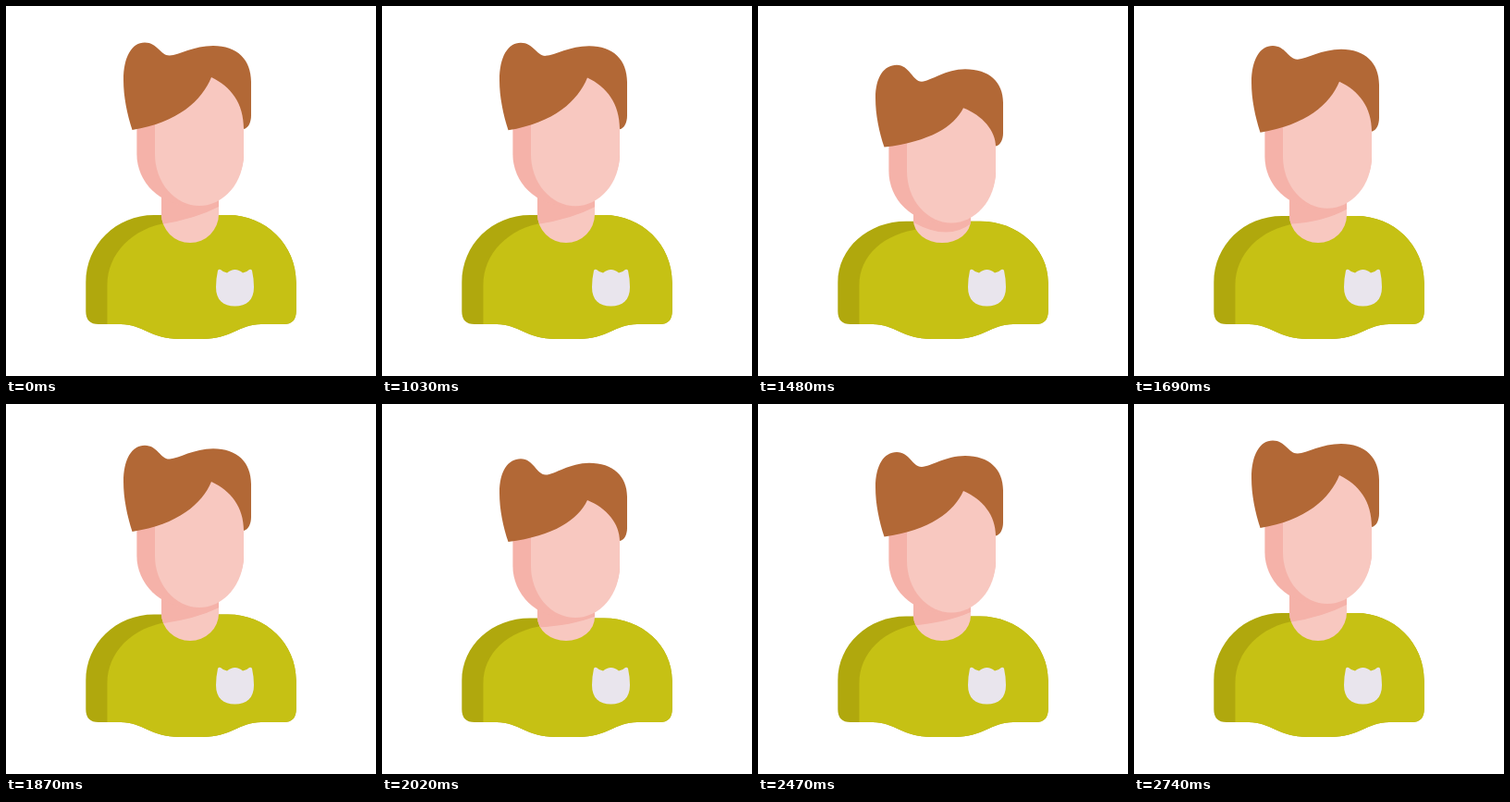
Recreate the animation shown at these times as an HTML page. Size 400 by 400 pixels, loop 2.77 s.

```html
<!DOCTYPE html>
<html>
<head>
<meta charset="utf-8">
<style>
html, body { margin: 0; width: 100%; height: 100%; overflow: hidden; background: #fff; }
svg { display: block; width: 100vw; height: 100vh; }
</style>
</head>
<body>
<svg viewBox="0 0 400 400">
  <clipPath id="torso"><path id="torsoShape"/></clipPath>
  <clipPath id="throat"><path id="throatShape"/></clipPath>
  <path id="body" fill="#b0a80d"/>
  <path id="shirt" fill="#c6c114" clip-path="url(#torso)"/>
  <path id="neck" fill="#f8c8c0"/>
  <path id="shade" fill="#f5b2a9" clip-path="url(#throat)"/>
  <path id="cheek" fill="#f5b2a9"/>
  <path id="face" fill="#f8c8c0"/>
  <path id="hair" fill="#b26836"/>
  <path fill="#e9e5ed" d="M229 286Q230 284 232 285Q235 288 239 288.500Q243 285 247.500 285Q252 285 256 288.500Q260 288 263 285Q265 284 266 286Q268 295 268 304C268 318 260 324.500 247.500 324.500C235 324.500 227 318 227 304Q227 295 229 286Z"/>
</svg>
<script>
// "a~b" is a value that runs from a (head up) to b (head down)
const torso = 'M86.300 299C86.300 258~262 119 226~233 160 226~233H240C281 226~233 313.700 258~262 313.700 299' +
  'V330Q313.700 344 300 344H276C252 344 244 360 212 360H188C156 360 148 344 124 344H100Q86.300 344 86.300 330Z';
const neck = 'M168 190V225~232A31 31~24 0 0 0 230 225~232V190Z';
const shapes = {
  torsoShape: torso, body: torso, throatShape: neck, neck,
  shirt: 'M109.5 360V302C109.5 268~270 136 240~246 176 234~241V220H320V360Z',
  cheek: 'M141.400 75~109V160~179A57.800 56 0 0 0 257 160~179V75~109Z',
  face: 'M161 75~109V160~179A48 56 0 0 0 257 160~179V75~109Z',
  hair: 'M136.500 134~153C131 117~137 127 98~118 127 80~100' +
    'C127 55~78 136 39.5~64.5 150 39.5~64.5' +
    'C164 39.5~64.5 167 54~82.500 177 53.5~82.500C187 53~82 203 43~69 224 43~69' +
    'C250 43~69 265 58~83 265 82~105V118~138C265 126~145 262 132~151 257 133~152' +
    'C257 105~136 243 87~119 222 77~111C212 102~131 186 126~147 136.500 134~153Z'
};
const shadeSlant = 'M160 190V236~243H168Q205 230~242 230 217~233H240V190Z';
const shadeCurve = 'M160 190V236~234H168Q205 230~255 230 217~236H240V190Z';

const LOOP = 2770, STEP = 30, REST = 1000;
const keys = [[0, 0], [15, 1], [25.5, 0], [37.5, 1], [42, 1], [56, 0]];

function nod(n) {
  if (n <= 0) return 0;
  for (let i = 1; i < keys.length; i++) {
    const [t0, a] = keys[i - 1], [t1, b] = keys[i];
    if (n <= t1) {
      const u = (n - t0) / (t1 - t0);
      return a + (b - a) * u * u * (3 - 2 * u);
    }
  }
  return 0;
}

const pose = (d, p) => d.replace(/([\d.]+)~([\d.]+)/g, (_, a, b) => +a + (b - a) * p);
const set = (id, d) => document.getElementById(id).setAttribute('d', d);
const start = performance.now();

function draw() {
  const t = Math.max(0, performance.now() - start) % LOOP;
  const n = Math.floor((t - REST) / STEP);
  const p = nod(n);
  for (const id in shapes) set(id, pose(shapes[id], p));
  set('shade', pose(n < 25.5 ? shadeCurve : shadeSlant, p));
  requestAnimationFrame(draw);
}
draw();
</script>
</body>
</html>
```
